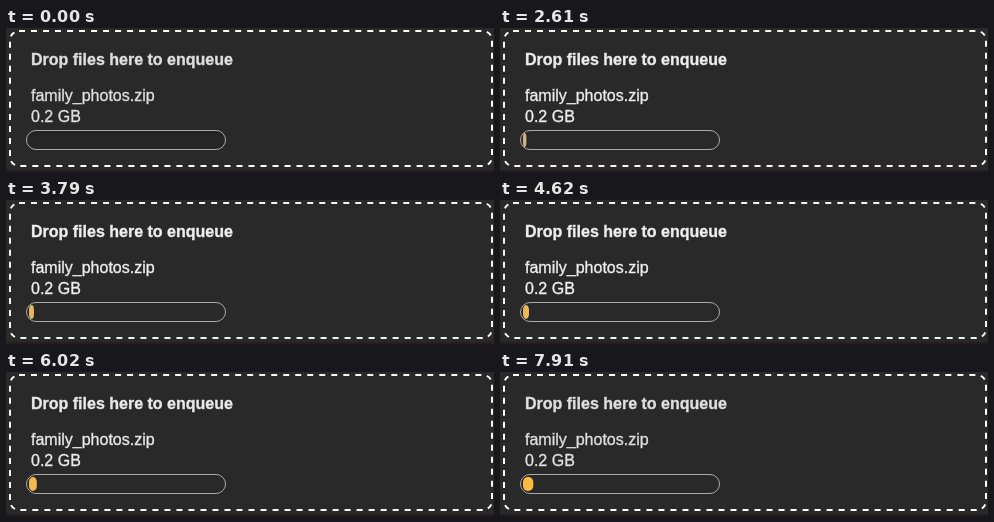
Write an HTML page that moves like this. It is 488 px wide and 144 px high and loops after 8000 ms.

```html
<!DOCTYPE html>
<html lang="en">
<head>
<meta charset="utf-8">
<title>Upload queue</title>
<style>
  html, body { margin: 0; width: 100%; height: 100%; overflow: hidden; background: #292929; }
  svg { display: block; width: 488px; height: 144px; }
  text { font: 16px "Liberation Sans", Arial, sans-serif; }
  .title { font-weight: bold; }
</style>
</head>
<body>
<svg viewBox="0 0 488 144">
  <defs>
    <linearGradient id="inset" x2="0" y2="1">
      <stop stop-color="#1f1f1f"/>
      <stop offset="0.4" stop-color="#262626"/>
    </linearGradient>
    <clipPath id="inside"><rect x="3" y="2" width="484" height="137" rx="10"/></clipPath>
  </defs>
  <rect width="488" height="144" fill="#292929"/>
  <rect y="142" width="488" height="2" fill="#241e21"/>
  <!-- The outer half of the stroke is clipped, leaving a 2px dashed border. -->
  <rect id="zone" x="3" y="2" width="484" height="137" rx="10" fill="none"
        stroke-width="4" stroke-dasharray="6 6.01" clip-path="url(#inside)"/>
  <g id="labels" stroke-width="0.35">
    <text class="title" x="25" y="37">Drop files here to enqueue</text>
    <text x="25" y="73">family_photos.zip</text>
    <text x="25" y="94">0.2 GB</text>
  </g>
  <rect id="track" x="20.5" y="102.5" width="199" height="19" rx="9.5" stroke="#aaa"/>
  <rect id="bar" x="23" y="105" height="14" rx="5"/>
</svg>
<script>
const LOOP = 8000;
const TRACK_INSET_END = 120;
const BAR_START = 840;
const BAR_PALEST = 2610;
const PIXELS_PER_MS = 0.0013;
const PALE = [205, 180, 130];
const WARM = [254, 186, 64];

const [zone, labels, track, bar] =
  ["zone", "labels", "track", "bar"].map(id => document.getElementById(id));

const rgb = channels => `rgb(${channels.map(Math.round)})`;
const gray = level => rgb([level, level, level]);
const blend = (from, to, mix) => rgb(from.map((value, i) => value + (to[i] - value) * mix));

function draw(elapsed) {
  const time = elapsed % LOOP;
  const pulse = Math.sin(Math.PI * time / LOOP);
  const warmth = Math.sqrt(Math.abs(time - BAR_PALEST) / (LOOP - BAR_PALEST));
  const labelColor = gray(222 + 16 * pulse);

  zone.setAttribute("stroke", gray(255 - 12 * pulse));
  labels.setAttribute("fill", labelColor);
  labels.setAttribute("stroke", labelColor);
  track.setAttribute("fill", time < TRACK_INSET_END ? "url(#inset)" : "#292929");
  bar.setAttribute("fill", blend(PALE, WARM, warmth));
  bar.setAttribute("width", time < BAR_START ? 0 : time * PIXELS_PER_MS);
}

let start;
function frame(now) {
  start ??= now;
  draw(now - start);
  requestAnimationFrame(frame);
}
draw(0);
requestAnimationFrame(frame);
</script>
</body>
</html>
```
